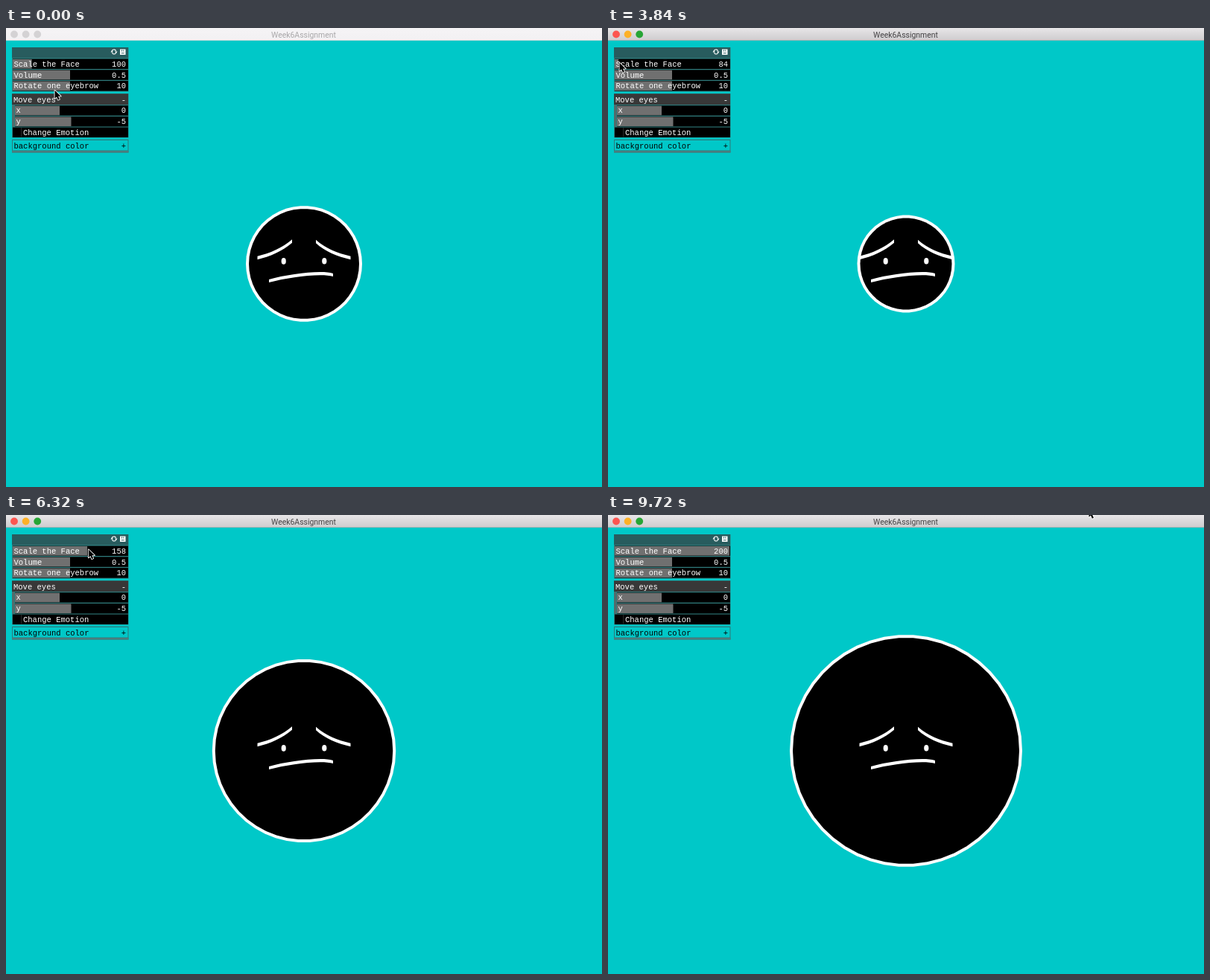
An HTML page with a canvas for the animation above (9.76 s loop, 800 px wide and 617 px high).

```html
<!DOCTYPE html>
<html lang="en">
<head>
<meta charset="utf-8">
<title>Face controls</title>
<style>
html, body { margin: 0; width: 100%; height: 100%; overflow: hidden; background: #00c8c8; }
canvas { display: block; }
</style>
</head>
<body>
<canvas id="stage" width="800" height="617"></canvas>
<script>
const ctx = document.getElementById('stage').getContext('2d');
const LOOP = 9760, STEP = 40;
const FOCUS_AT = 1480, DRAG_AT = 2920;
const TEAL = '#00c8c8', FILL = '#707070';
const MIN = 80, MAX = 200, TRACK_X = 9, TRACK_W = 154;

// Pointer keys: time, x, y
const POINTER = [
  [0, 65, 83], [720, 34, 62], [920, 34, 62], [1320, 12, 46], [2640, 10, 45],
  [3400, 11, 46], [4720, 23, 46], [5680, 91.7, 45], [7000, 130, 46],
  [8120, 174, 51], [8600, 182, 50], [9360, 184, 36], [9480, 205, 22], [9720, 645, -9]
];

const clamp = (v, lo, hi) => Math.min(hi, Math.max(lo, v));

function pointerAt(t) {
  let i = 1;
  while (i < POINTER.length - 1 && POINTER[i][0] < t) i++;
  const [t0, x0, y0] = POINTER[i - 1], [t1, x1, y1] = POINTER[i];
  const k = clamp((t - t0) / (t1 - t0), 0, 1);
  return { x: x0 + (x1 - x0) * k, y: y0 + (y1 - y0) * k };
}

function scaleAt(t) {
  if (t < DRAG_AT) return 100;
  const raw = MIN + (pointerAt(Math.min(t, 8120)).x - 1.5 - TRACK_X) / TRACK_W * (MAX - MIN);
  return Math.round(clamp(raw, MIN, MAX));
}

function rect(x, y, w, h, color) {
  ctx.fillStyle = color;
  ctx.fillRect(x, y, w, h);
}

function ellipse(x, y, rx, ry, color) {
  ctx.fillStyle = color;
  ctx.beginPath();
  ctx.ellipse(x, y, rx, ry, 0, 0, Math.PI * 2);
  ctx.fill();
}

function label(text, x, y, color = '#fff', align = 'left') {
  ctx.font = '10.53px "Liberation Mono", monospace';
  ctx.textAlign = align;
  ctx.fillStyle = color;
  ctx.fillText(text, x, y);
}

function polygon(points, color) {
  ctx.fillStyle = color;
  ctx.beginPath();
  points.forEach(([x, y]) => ctx.lineTo(x, y));
  ctx.closePath();
  ctx.fill();
}

function disc(radius, color) {
  const sides = 50;
  polygon(Array.from({ length: sides }, (_, i) => {
    const a = i / sides * Math.PI * 2;
    return [400 + radius * Math.cos(a), 317 + radius * Math.sin(a)];
  }), color);
}

// A curved band with vertical ends
function band(x0, y0, x1, y1, x2, y2, x3, y3, thick = 4.2) {
  const h = thick / 2;
  ctx.fillStyle = '#fff';
  ctx.beginPath();
  ctx.moveTo(x0, y0 - h);
  ctx.bezierCurveTo(x1, y1 - h, x2, y2 - h, x3, y3 - h);
  ctx.lineTo(x3, y3 + h);
  ctx.bezierCurveTo(x2, y2 + h, x1, y1 + h, x0, y0 + h);
  ctx.fill();
}

function drawFace(scale) {
  const radius = scale * 0.78;
  disc(radius, '#fff');
  disc(radius - 4, '#000');
  band(337.5, 309, 354, 305, 371, 298, 384, 286.5, 4.6);
  band(416, 287, 428, 298, 445, 305, 462.5, 309, 4.6);
  ellipse(372.7, 313.4, 3.1, 4.3, '#fff');
  ellipse(427.3, 313.2, 3.1, 4.3, '#fff');
  band(353, 340, 379, 333, 423, 327, 439, 332);
}

function drawTitleBar(active) {
  const shade = ctx.createLinearGradient(0, 0, 0, 16);
  shade.addColorStop(0, active ? '#e8e6e8' : '#f5f3f5');
  shade.addColorStop(1, active ? '#cfcdcf' : '#f3f1f3');
  rect(0, 0, 800, 16, shade);
  rect(0, 16, 800, 1, active ? '#a9b4b4' : '#cfdcdc');
  const lights = active ? ['#fc5550', '#fdb127', '#27a535'] : ['#d4d2d4', '#d4d2d4', '#d4d2d4'];
  lights.forEach((color, i) => ellipse(11 + i * 15.6, 8.5, 4.9, 4.9, color));
  ctx.font = '10.45px Roboto, sans-serif';
  ctx.textAlign = 'center';
  ctx.fillStyle = active ? '#454345' : '#a9a7a9';
  ctx.fillText('Week6Assignment', 399.5, 12.6);
}

function slider(name, value, x, y, fillWidth) {
  rect(x, y, 164 - x, 13.5, '#000');
  rect(x, y + 0.5, fillWidth, 12.5, FILL);
  label(name, x + 1.5, y + 10.2);
  label(value, 161, y + 10.2, '#fff', 'right');
}

function drawIcons() {
  ctx.strokeStyle = '#fff';
  ctx.lineWidth = 1.1;
  ctx.beginPath();
  ctx.arc(145, 32, 3, Math.PI * 1.1, Math.PI * 1.85);
  ctx.stroke();
  ctx.beginPath();
  ctx.arc(145, 32, 3, Math.PI * 0.1, Math.PI * 0.85);
  ctx.stroke();
  polygon([[146, 31.5], [149.5, 31.5], [147.8, 34]], '#fff');
  polygon([[140.5, 32.5], [144, 32.5], [142.2, 30]], '#fff');
  rect(153, 28.5, 7.5, 7.5, '#fff');
  rect(155, 29.5, 1, 2, '#2a5c5e');
  rect(157.3, 29.5, 1, 2, '#2a5c5e');
  rect(154.7, 33.3, 4, 1, '#2a5c5e');
}

function drawPanel(scale) {
  rect(8, 26, 156.5, 141.5, '#2f7a7b');
  rect(8, 26, 156, 14, '#285c5e');
  drawIcons();

  slider('Scale the Face', String(scale), 9, 41.5, (scale - MIN) / (MAX - MIN) * TRACK_W);
  slider('Volume', '0.5', 9, 56.3, TRACK_W / 2);
  slider('Rotate one eyebrow', '10', 9, 71.1, TRACK_W / 2);

  rect(8, 85.5, 157, 2.5, TEAL);
  rect(8, 88.5, 156, 14.5, '#383838');
  label('Move eyes', 10, 99.5);
  label('-', 161, 99.5, '#fff', 'right');
  rect(8, 103.5, 3, 29, '#536b6b');
  slider('x', '0', 12, 104.2, 60);
  slider('y', '-5', 12, 119, 75.5);
  rect(9, 133.6, 155, 13.4, '#000');
  rect(20, 134, 0.7, 12.5, '#3a3a3a');
  label('Change Emotion', 23, 144);

  rect(8, 147.4, 157, 2.4, TEAL);
  rect(9, 151, 154.5, 13.5, TEAL);
  label('background color', 10.5, 162, '#000');
  label('+', 161, 162, '#000', 'right');
  rect(8, 165, 156.5, 2.5, '#4a7c7d');
}

function drawPointer({ x, y }) {
  ctx.save();
  ctx.translate(x, y);
  const arrow = new Path2D('M.5 .8V11.8L3 9.5L4.9 13.7L6.9 12.8L5.1 8.7H8.6Z');
  ctx.lineJoin = 'round';
  ctx.lineWidth = 1.7;
  ctx.strokeStyle = '#fff';
  ctx.stroke(arrow);
  ctx.fillStyle = '#000';
  ctx.fill(arrow);
  ctx.restore();
}

function draw(now) {
  const t = Math.floor(now % LOOP / STEP) * STEP;
  const scale = scaleAt(t);
  rect(0, 0, 800, 617, TEAL);
  drawFace(scale);
  drawPanel(scale);
  drawTitleBar(t >= FOCUS_AT);
  drawPointer(pointerAt(t));
}

const start = performance.now();
function tick() {
  draw(performance.now() - start);
  requestAnimationFrame(tick);
}
tick();
</script>
</body>
</html>
```
